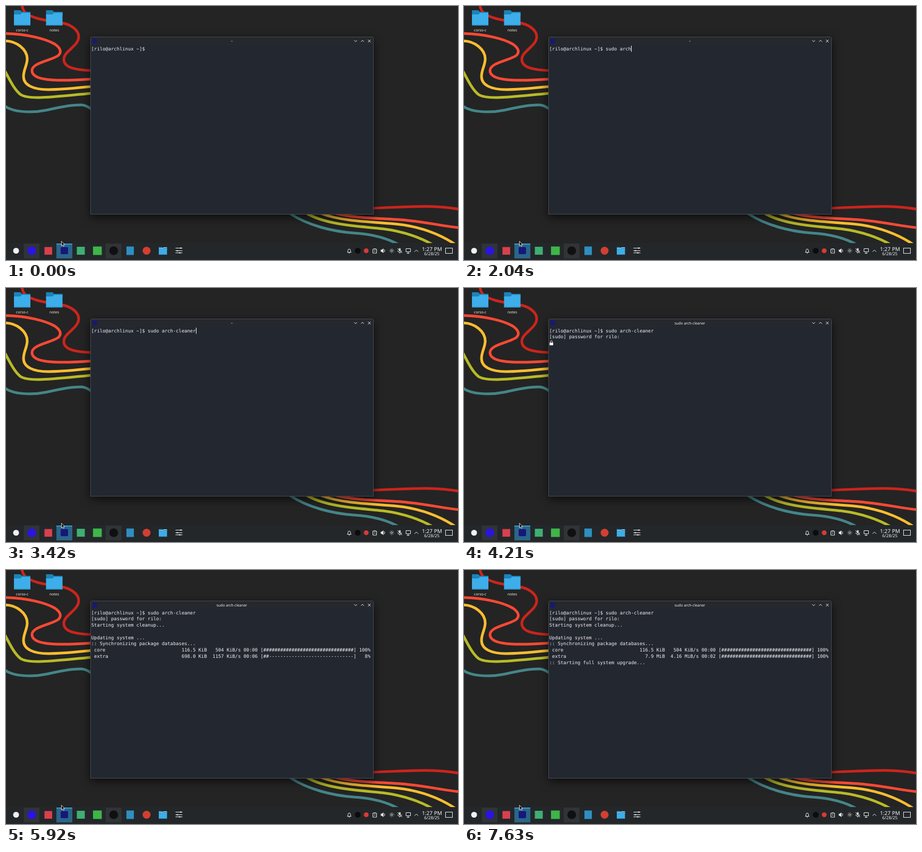
Write an HTML page that moves like this. It is 852x480 px and loops after 8 s.

```html
<!DOCTYPE html>
<html lang="en">
<head>
<meta charset="utf-8">
<title>Terminal session</title>
<style>
  html, body { margin: 0; width: 100%; height: 100%; overflow: hidden; background: #242424; }
  svg { display: block; }
  text { text-rendering: geometricPrecision; fill: #f4f4f4; white-space: pre; }
  .ui { font: 6.9px "Noto Sans", sans-serif; text-anchor: middle; }
  .term { font: 8.837px "DejaVu Sans Mono", monospace; font-variant-ligatures: none; }
  .ribbon { fill: none; stroke-width: 5; }
  .line { fill: none; stroke: #eee; stroke-width: 1; }
  .window { filter: drop-shadow(0 5px 9px #000a); }
</style>
</head>
<body>
<svg width="852" height="480" viewBox="0 0 852 480">
  <defs>
    <g id="folder">
      <path d="M0 1h12l3 3h16v8H0z" fill="#1c83b8"/>
      <path d="M0 9h12l3-3h16v24H0z" fill="#3daee9"/>
      <path d="M0 29.2h31" stroke="#2b87b7" stroke-width="1.4"/>
    </g>
  </defs>
  <rect width="852" height="480" fill="#242424"/>

  <g class="ribbon">
    <g stroke="#cc241d">
      <path d="M30-2C32 14 42 18 58 23S92 29 110 33C122 36 137 45 137 58C137 76 109 85 109 101C109 117 132 121 162 122"/>
      <path d="M688 382C745 381 800 374 854 384"/>
    </g>
    <g stroke="#fb4934">
      <path d="M-2 52C40 53 75 62 92 72C102 79 105 86 100 92C92 102 49 106 49 122C49 141 90 143 162 138"/>
      <path d="M622 392C660 402 715 401 755 405C795 409 825 416 854 419"/>
    </g>
    <g stroke="#fabd2f">
      <path d="M-2 66C20 66 40 82 40 100C40 112 33 120 33 133C33 150 52 158 80 158C110 158 140 154 162 152"/>
      <path d="M594 392C632 407 690 408 735 412C785 417 822 433 852 454"/>
    </g>
    <g stroke="#b8bb26">
      <path d="M-2 123C6 137 14 156 27 167C44 179 100 170 162 165"/>
      <path d="M567 392C605 414 665 416 710 421C750 426 780 437 806 452"/>
    </g>
    <g stroke="#458588">
      <path d="M-2 189C12 200 46 203 75 197S125 186 143 187Q153 188 162 196"/>
      <path d="M535 392C570 415 615 426 655 429C690 431 718 438 742 452"/>
    </g>
  </g>

  <use href="#folder" x="15" y="7"/>
  <use href="#folder" x="75.5" y="7"/>
  <g class="ui">
    <text x="30.5" y="47.8">corso-c</text>
    <text x="91" y="47.8">notes</text>
  </g>

  <!-- window -->
  <g class="window">
    <path d="M159.500 393.500V61q0-2.500 2.500-2.500h528q2.500 0 2.500 2.500v332.500z" fill="#232730" stroke="#484c52"/>
  </g>
  <path d="M160 74V61q0-2 2-2h528q2 0 2 2v13z" fill="#25282d"/>
  <rect x="163" y="62" width="8.500" height="8.500" rx="1" fill="#17177a"/>
  <text class="ui" id="title" x="425.700" y="68.800"></text>
  <path class="line" d="M656.300 64.800l2.700 2.700 2.700-2.700M669.300 67.500l2.700-2.700 2.700 2.700M682.300 63.700l5 5m0-5l-5 5"/>
  <g class="term" id="screen"></g>
  <rect id="caret" y="75" width="1" height="11.500" fill="#fff"/>
  <g id="lock">
    <rect x="161.300" y="103.300" width="6.800" height="5" rx=".6" fill="#fff"/>
    <path class="line" d="M162.700 103.500v-1.600a2 2 0 0 1 4 0v1.600"/>
  </g>

  <!-- panel -->
  <rect y="448" width="852" height="32" fill="#23272a"/>
  <path d="M33.500 449h29.500v28H33.500zM188 449h29.500v28H188z" fill="#303437"/>
  <rect x="95" y="449" width="30" height="28" fill="#2a6688"/>
  <rect x="95" y="449" width="30" height="1.500" fill="#3daee9"/>
  <circle cx="19" cy="462.500" r="5.500" fill="#f0f0f0"/>
  <circle cx="48.500" cy="462.500" r="8.300" fill="#2b14e0"/>
  <rect x="72.500" y="455.500" width="14.500" height="14.500" fill="#d8404c"/>
  <rect x="103" y="455.500" width="14" height="13.500" rx="2" fill="#17177a"/>
  <rect x="133.500" y="455" width="15" height="15" fill="#3fae73"/>
  <rect x="164" y="454.500" width="16.500" height="16" fill="#3fb548"/>
  <circle cx="203" cy="462.500" r="8.300" fill="#101012"/>
  <rect x="227" y="454.500" width="14" height="16" fill="#2f8fc0"/>
  <circle cx="265" cy="462.500" r="7.500" fill="#d23f31"/>
  <use href="#folder" transform="translate(288 455) scale(.5)"/>
  <path d="M288 458h7l1.500-1.500h7" fill="none" stroke="#d5ecf8"/>
  <path class="line" d="M319.500 457.500h13M319.500 462.500h13M319.500 466.500h13" stroke-width=".8"/>
  <path d="M328 456.500h3v2h-3zM321.500 461.500h3v2h-3zM326 465.500h3v2h-3z" fill="#eee"/>

  <!-- tray -->
  <path class="line" d="M643.500 465.500h7q-1.300-1.200-1.300-4a2.200 2.200 0 0 0-4.400 0q0 2.800-1.300 4M646 467h2"/>
  <circle cx="663" cy="462.500" r="5.500" fill="#0c0c0d"/>
  <circle cx="679" cy="462.500" r="4.500" fill="#da3a33"/>
  <path class="line" d="M691.500 459.500h7v7.500h-7zM693 459h4M693.500 463h3"/>
  <path d="M706.500 460.500h2l3-2.500v9l-3-2.500h-2z" fill="#eee"/>
  <path class="line" d="M713 460q2 2.500 0 5"/>
  <circle class="line" cx="727" cy="462.500" r="1.800"/>
  <circle class="line" cx="727" cy="462.500" r="4" stroke-dasharray="1 2.140"/>
  <rect x="740.500" y="457.500" width="3.500" height="6" rx="1.700" fill="#ccc"/>
  <path class="line" d="M738.500 462q0 3.500 3.700 3.500t3.700-3.500M742.200 465.500v2M738 458l8.500 9"/>
  <path class="line" d="M754 458.500h8.500v6H754zM758 465v2.500M755.500 467.500h5"/>
  <path class="line" d="M770 464.500l3.500-3.500 3.500 3.500"/>
  <rect class="line" x="828.500" y="457.500" width="13" height="10"/>
  <g class="ui">
    <text x="803" y="462.700" style="font-size:10.100px">1:27 PM</text>
    <text x="802.700" y="471.300" style="font-size:8px">6/28/25</text>
  </g>
  <path d="M104.500 444.500v8.700l2-1.700 1.500 3 1.600-.8-1.500-2.900 2.500-.2z" fill="#111" stroke="#fff" stroke-width=".8"/>
</svg>
<script>
const LOOP = 8000, LEFT = 160.8, COLUMN = 5.32, ROW = 11.75;
const PROMPT = "[rilo@archlinux ~]$ ", COMMAND = "sudo arch-cleaner";
const KEY_TIMES = [830, 1000, 1170, 1330, 1420, 1500, 1670, 1880, 2040,
  2380, 2460, 2580, 2750, 2960, 3170, 3340, 3420];
const CARET_ON = 420, ENTER = 3670, SUDO = 4000, LOCK_ON = 4080, ACCEPTED = 5540;

// time, size, speed, clock, fraction done
const DOWNLOAD = [
  [5830, "210.0 KiB", "702 KiB/s", "00:11", .026],
  [5920, "698.0 KiB", "1157 KiB/s", "00:06", .086],
  [6120, "1486.0 KiB", "1848 KiB/s", "00:04", .184],
  [6330, "2.4 MiB", "2.36 MiB/s", "00:02", .304],
  [6500, "3.5 MiB", "2.87 MiB/s", "00:02", .443],
  [6710, "4.7 MiB", "3.32 MiB/s", "00:01", .595],
  [6880, "5.8 MiB", "3.65 MiB/s", "00:01", .734],
  [7090, "7.0 MiB", "3.94 MiB/s", "00:00", .886],
  [7330, "7.9 MiB", "4.16 MiB/s", "00:02", 1]
];

function progressLine(name, size, speed, clock, done) {
  const bar = "#".repeat(Math.floor(done * 32)).padEnd(32, "-");
  const percent = Math.floor(done * 100) + "%";
  return " " + name + size.padStart(40 - name.length) + speed.padStart(12) +
    ` ${clock} [${bar}] ${percent.padStart(4)}`;
}

// time, row, text
const OUTPUT = [
  [SUDO, 1, "[sudo] password for rilo:"],
  [ACCEPTED, 2, "Starting system cleanup..."],
  [ACCEPTED, 4, "Updating system ..."],
  [5580, 5, ":: Synchronizing package databases..."],
  [5710, 6, progressLine("core", "116.5 KiB", "504 KiB/s", "00:00", 1)],
  ...DOWNLOAD.map(([time, ...values]) => [time, 7, progressLine("extra", ...values)]),
  [7420, 8, ":: Starting full system upgrade..."]
];

const byId = id => document.getElementById(id);
const title = byId("title"), caret = byId("caret"), lock = byId("lock");
const rows = Array.from({ length: 9 }, (_, i) => {
  const row = document.createElementNS("http://www.w3.org/2000/svg", "text");
  row.setAttribute("x", LEFT);
  row.setAttribute("y", 83.7 + i * ROW);
  return byId("screen").appendChild(row);
});

const setText = (node, value) => { if (node.textContent !== value) node.textContent = value; };
const show = (node, on) => node.setAttribute("visibility", on ? "visible" : "hidden");

function draw(now) {
  const t = now % LOOP;
  const typed = KEY_TIMES.filter(time => time <= t).length;
  const lines = Array(rows.length).fill("");
  lines[0] = PROMPT + COMMAND.slice(0, typed);
  for (const [time, row, text] of OUTPUT) if (t >= time) lines[row] = text;
  lines.forEach((line, i) => setText(rows[i], line));

  setText(title, t < SUDO ? "~" : COMMAND);
  caret.setAttribute("x", Math.round(LEFT + (PROMPT.length + typed) * COLUMN));
  show(caret, t >= CARET_ON && t < ENTER);
  show(lock, t >= LOCK_ON && t < ACCEPTED);
  requestAnimationFrame(draw);
}
draw(performance.now());
</script>
</body>
</html>
```
